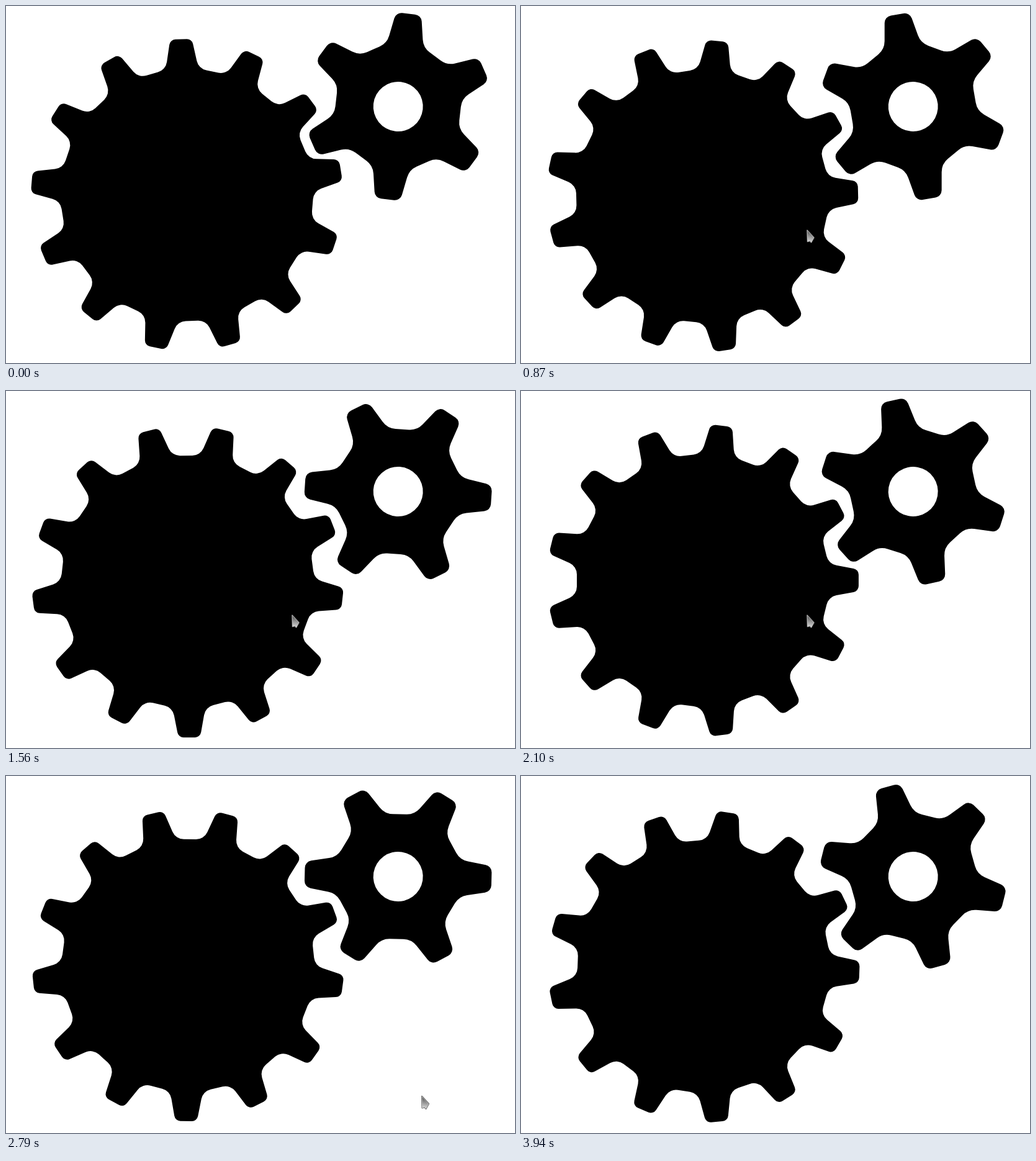
Animation of 820 by 575 pixels, one loop 4.01 s. Source, as an HTML page with a canvas:

```html
<!DOCTYPE html>
<html lang="en">
<head>
<meta charset="utf-8">
<title>Two gears</title>
<style>
  html, body { margin: 0; width: 100%; height: 100%; overflow: hidden; background: #fff; }
  canvas { display: block; }
</style>
</head>
<body>
<canvas id="stage" width="820" height="575"></canvas>
<script>
const ctx = document.getElementById('stage').getContext('2d');
const LOOP = 4010;
const STEPS = 51;
const RAD = Math.PI / 180;

const large = { teeth: 13, root: 202.5, rootHalf: 26.5, tip: 251, tipHalf: 17.5, fillet: 20, corner: 10 };
const small = { teeth: 6, root: 99, rootHalf: 29.5, tip: 150.5, tipHalf: 20.5, fillet: 28, corner: 12 };

const clamp = v => Math.min(1, Math.max(0, v));

// The first pose is held; later steps last 80, 80, 70 ms in turn.
const startOf = step => step < 2 ? step * 170 : Math.ceil(18 + 23 * (step - 1) / 3) * 10;

function gearPath(g) {
  const points = [];
  for (let i = 0; i < g.teeth; i++) {
    const c = Math.cos(i * 2 * Math.PI / g.teeth);
    const s = Math.sin(i * 2 * Math.PI / g.teeth);
    const add = (r, w, round) => points.push([r * c - w * s, r * s + w * c, round]);
    add(g.root, -g.rootHalf, g.fillet);
    add(g.tip, -g.tipHalf, g.corner);
    add(g.tip, g.tipHalf, g.corner);
    add(g.root, g.rootHalf, g.fillet);
  }
  const path = new Path2D();
  const last = points[points.length - 1];
  path.moveTo((last[0] + points[0][0]) / 2, (last[1] + points[0][1]) / 2);
  points.forEach(([x, y, round], i) => {
    const next = points[(i + 1) % points.length];
    path.arcTo(x, y, next[0], next[1], round);
  });
  path.closePath();
  return path;
}

const largePath = gearPath(large);
const smallPath = gearPath(small);
smallPath.moveTo(40, 0);
smallPath.arc(0, 0, 40, 0, 2 * Math.PI);

function drawGear(path, x, y, angle) {
  ctx.save();
  ctx.translate(x, y);
  ctx.rotate(angle * RAD);
  ctx.fillStyle = '#000';
  ctx.fill(path, 'evenodd');
  ctx.restore();
}

const arrow = new Path2D('M0 0L11 12L6.5 20L4.5 17.5L.5 18.5Z');
const shade = ctx.createLinearGradient(6, 4, 4, 20);
shade.addColorStop(0, '#666');
shade.addColorStop(1, '#ddd');

function drawPointer(x, y) {
  ctx.save();
  ctx.translate(x, y);
  ctx.lineJoin = 'round';
  ctx.strokeStyle = '#444';
  ctx.lineWidth = 2;
  ctx.stroke(arrow);
  ctx.fillStyle = shade;
  ctx.fill(arrow);
  ctx.strokeStyle = '#ccc';
  ctx.lineWidth = 0.8;
  ctx.stroke(arrow);
  ctx.restore();
}

function draw(time) {
  let step = STEPS - 1;
  while (startOf(step) > time) step--;
  const now = startOf(step);
  const turned = Math.max(0, step - 1);

  ctx.fillStyle = '#fff';
  ctx.fillRect(0, 0, 820, 575);

  // The large gear drifts and bobs slightly as it turns.
  const x = 291.5 + 0.055 * step;
  const y = 305.8 + 1.5 * Math.cos((step - 16) * 12 * RAD);
  drawGear(largePath, x, y, -92.2 + 7.01 * turned);
  drawGear(smallPath, 631.7, 162, -83.5 - 15.15 * turned);

  // The pointer comes in from below, rests, then leaves to the lower right.
  const away = 1 - clamp((now - 330) / 310);
  const leaving = Math.max(0, (now - 2290) / 500);
  drawPointer(461 + 99 * away + 209 * leaving, 361 + 218 * away + 155 * leaving);
}

const begin = performance.now();
function tick() {
  draw((performance.now() - begin) % LOOP);
  requestAnimationFrame(tick);
}
tick();
</script>
</body>
</html>
```
